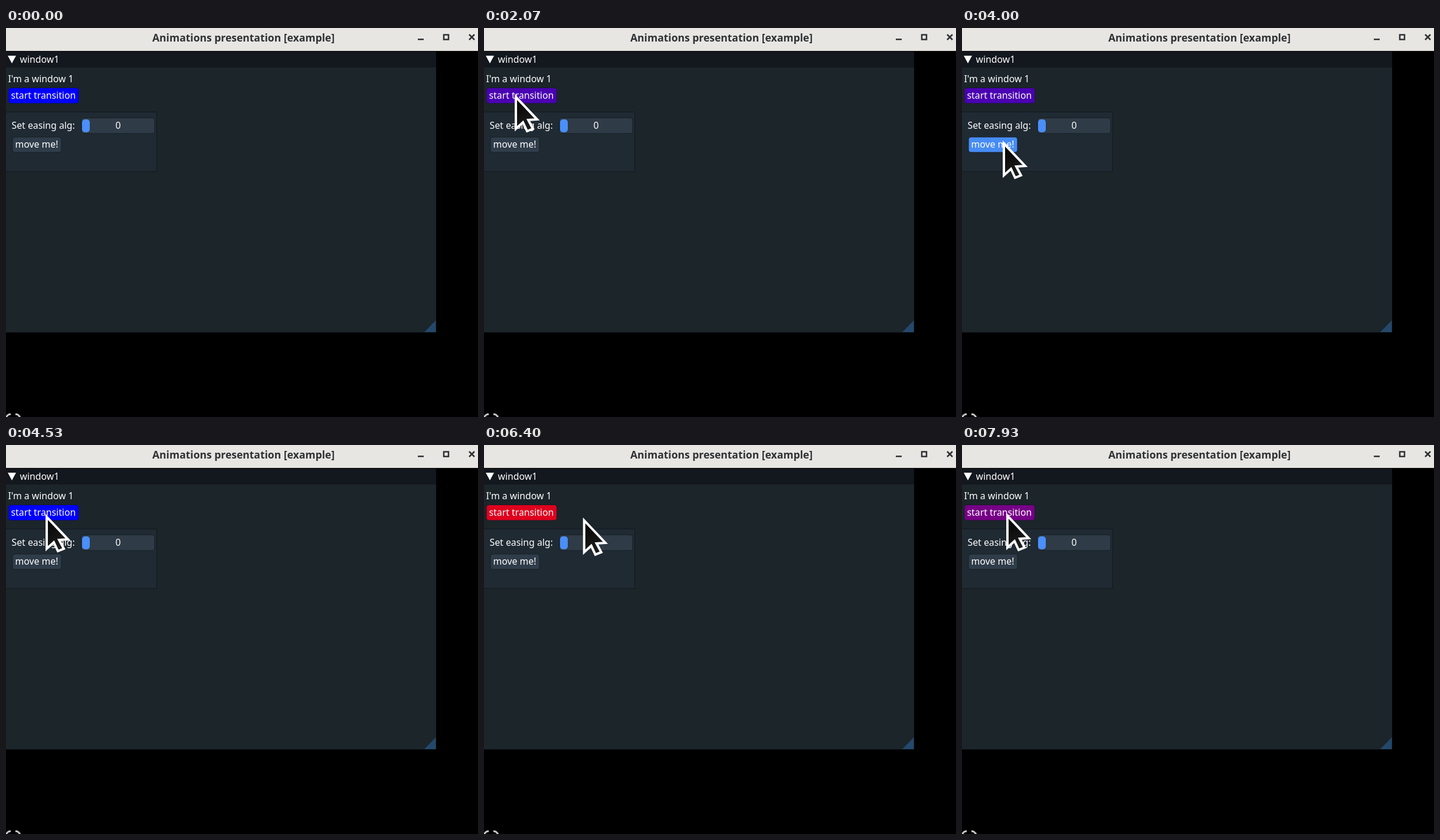
An HTML page with a canvas that plays this animation: 800 px wide and 660 px high, repeating every 8 s.

```html
<!DOCTYPE html>
<html lang="en">
<head>
<meta charset="utf-8">
<title>Animations presentation</title>
<style>
  html, body { margin: 0; width: 100%; height: 100%; overflow: hidden; background: #000; }
  canvas { display: block; }
</style>
</head>
<body>
<canvas id="stage" width="800" height="660"></canvas>
<script>
const ctx = document.getElementById('stage').getContext('2d');
const LOOP = 8000, STEP = 200 / 3, FADE = 1000;
const START_BUTTON = { x: 4.5, y: 102, w: 118.5, h: 25.5 };
const MOVE_BUTTON = { x: 11.5, y: 185.5, w: 82, h: 25 };
const ENTRY = { x: 345, y: 680 };

// Each glide eases the pointer from where it rests to a new place
const GLIDES = [
  { from: 300, to: 1200, x: 128, y: 177 },
  { from: 1300, to: 1850, x: 53, y: 115 },
  { from: 3310, to: 3400, x: 70, y: 194 },
  { from: 4350, to: 4530, x: 68, y: 120 },
  { from: 6240, to: 6480, x: 204, y: 128 },
  { from: 6700, to: 7800, x: 76, y: 118 }
];

const clamp = value => Math.max(0, Math.min(1, value));
const smooth = u => u * u * (3 - 2 * u);
const inside = (p, r) => p.x > r.x && p.x < r.x + r.w && p.y > r.y && p.y < r.y + r.h;

function pointerAt(time) {
  return GLIDES.reduce((p, glide) => {
    const u = smooth(clamp((time - glide.from) / (glide.to - glide.from)));
    return { x: p.x + (glide.x - p.x) * u, y: p.y + (glide.y - p.y) * u };
  }, ENTRY);
}

// Hovering turns the button red step by step, leaving turns it back
function rednessAt(step) {
  let redness = 0;
  for (let i = 0; i < step; i++) {
    const hovered = inside(pointerAt(i * STEP), START_BUTTON);
    redness = clamp(redness + (hovered ? STEP : -STEP) / FADE);
  }
  return redness;
}

function rect(x, y, w, h, color) {
  ctx.fillStyle = color;
  ctx.fillRect(x, y, w, h);
}

function box({ x, y, w, h }, radius, fill, border) {
  ctx.beginPath();
  ctx.roundRect(x, y, w, h, radius);
  ctx.fillStyle = fill;
  if (border) {
    ctx.strokeStyle = border;
    ctx.lineWidth = 2;
    ctx.stroke();
  }
  ctx.fill();
}

function polygon(points, color) {
  ctx.beginPath();
  points.forEach(p => ctx.lineTo(...p));
  ctx.closePath();
  ctx.fillStyle = color;
  ctx.fill();
}

function lines(color, width, ...paths) {
  ctx.strokeStyle = color;
  ctx.lineWidth = width;
  ctx.beginPath();
  for (const [start, ...rest] of paths) {
    ctx.moveTo(...start);
    rest.forEach(p => ctx.lineTo(...p));
  }
  ctx.stroke();
}

function label(text, x, y, align = 'left', font = '15.8px "Noto Sans", sans-serif', color = '#fff') {
  ctx.font = font;
  ctx.textAlign = align;
  ctx.fillStyle = color;
  ctx.fillText(text, x, y);
}

function drawTitleBar() {
  const ink = '#2e3234';
  rect(0, 0, 800, 39, '#e8e6e3');
  rect(0, 38, 800, 1, '#d5d1cd');
  label('Animations presentation [example]', 402.5, 22.5, 'center',
    'bold 17.5px "Noto Sans", sans-serif', ink);
  rect(698, 18, 10, 2.5, ink);
  ctx.strokeStyle = ink;
  ctx.lineWidth = 2.5;
  ctx.strokeRect(742, 11.5, 8, 8);
  lines(ink, 2.5, [[785, 11], [794, 20]], [[794, 11], [785, 20]]);
}

function drawWindow(redness, moveHovered) {
  const edge = '#161e25';
  rect(0, 40, 729, 476.5, '#1c252a');
  rect(0, 40, 729, 27, '#13171e');
  polygon([[3, 47], [17, 47], [10, 60]], '#fff');
  polygon([[709, 516], [728.5, 516], [728.5, 496]], '#24486c');
  label('window1', 23.5, 58.5);
  label("I'm a window 1", 3.5, 91.5);

  const color = `rgb(${222 * redness}, 0, ${252 - 222 * redness})`;
  box(START_BUTTON, 4, color, edge);
  label('start transition', 8.5, 120);

  box({ x: 0, y: 143, w: 255, h: 100 }, 0, '#202a33', '#12181d');
  label('Set easing alg:', 9.5, 171);
  box({ x: 128, y: 153, w: 123.5, h: 25.5 }, 4, '#2f3b46', edge);
  box({ x: 129, y: 155, w: 13, h: 22 }, 5, '#4a8ffa');
  label('0', 190, 171, 'center');
  box(MOVE_BUTTON, 4, moveHovered ? '#478cf5' : '#2f3c49', edge);
  label('move me!', 15.5, 203);
}

function drawPointer({ x, y }) {
  ctx.save();
  ctx.translate(x - 1, y - 1);
  const shade = ctx.createLinearGradient(0, 0, 30, 50);
  shade.addColorStop(0, '#000');
  shade.addColorStop(1, '#1c1c1c');
  polygon([[2, 3], [2, 57], [14, 46], [21, 61], [31, 57], [23, 42], [38, 41]], shade);
  ctx.strokeStyle = '#fff';
  ctx.lineWidth = 4;
  ctx.stroke();
  ctx.restore();
}

function draw(now) {
  // The small offset absorbs rounding at step boundaries
  const step = Math.floor((now % LOOP) / STEP + 0.06);
  const pointer = pointerAt(step * STEP);
  rect(0, 0, 800, 660, '#000');
  drawTitleBar();
  drawWindow(rednessAt(step), inside(pointer, MOVE_BUTTON));
  lines('#c8c8c8', 3, [[8, 655], [4, 656], [0, 660]], [[16, 655], [20, 656], [24, 660]]);
  drawPointer(pointer);
}

const start = performance.now();
function tick() {
  draw(performance.now() - start);
  requestAnimationFrame(tick);
}
tick();
</script>
</body>
</html>
```
